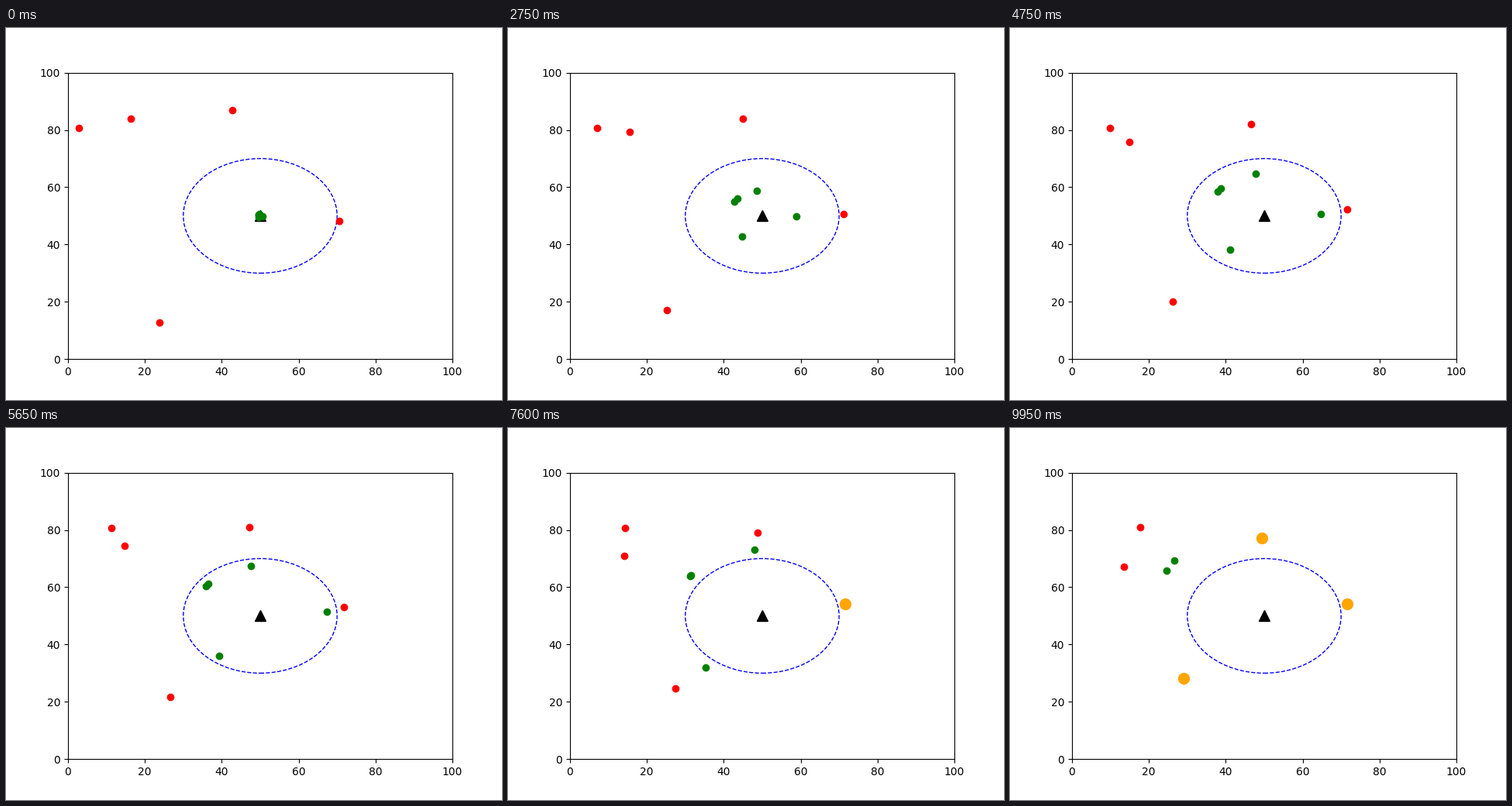
Recreate the animation shown at these times as a matplotlib script. Size 640x480 px, loop 10 s.

```python
import numpy as np
import matplotlib.pyplot as plt
from matplotlib.animation import FuncAnimation

FRAMES = 200
LEAD = 4            # steps the chasers have taken before the loop starts
SPEED = 0.15
HIT_RANGE = 1.0
BASE = np.array([50.0, 50.0])

# Each intruder flies straight from one key point to the other during a loop
ROUTES = [((2.85, 80.63), (17.81, 80.85)),
          ((16.40, 83.92), (13.44, 67.01)),
          ((42.77, 86.89), (50.58, 76.45)),
          ((70.58, 48.21), (72.54, 56.87)),
          ((23.79, 12.74), (28.69, 28.44))]


def simulate(start, end):
    """Yield (intruder, chaser, hit) for every frame of one pursuit."""
    start, end = np.array(start), np.array(end)
    chaser = BASE.copy()
    hit = False
    for step in range(1 - LEAD, FRAMES):
        if not hit:
            intruder = start + (end - start) * step / FRAMES
            gap = intruder - chaser
            chaser = chaser + SPEED * gap / np.hypot(*gap)
            hit = np.hypot(*(intruder - chaser)) < HIT_RANGE
        if step >= 0:
            yield intruder, chaser, hit


pursuits = [list(simulate(*route)) for route in ROUTES]

fig, ax = plt.subplots(figsize=(6.4, 4.8), dpi=100)
ax.set_xlim(0, 100)
ax.set_ylim(0, 100)
ax.add_patch(plt.Circle(BASE, 20, color="blue", fill=False, linestyle="--"))
ax.plot(*BASE, "k^", markersize=10)
red_dots, = ax.plot([], [], "ro")
green_dots, = ax.plot([], [], "go")
blast_dots, = ax.plot([], [], "o", color="orange", markersize=10)


def place(dots, points):
    dots.set_data([x for x, _ in points], [y for _, y in points])


def draw(frame):
    states = [pursuit[frame] for pursuit in pursuits]
    place(red_dots, [red for red, _, hit in states if not hit])
    place(green_dots, [green for _, green, hit in states if not hit])
    place(blast_dots, [(red + green) / 2 for red, green, hit in states if hit])
    return red_dots, green_dots, blast_dots


anim = FuncAnimation(fig, draw, frames=FRAMES, interval=50,
                     repeat=True, repeat_delay=0)
plt.show()
```
